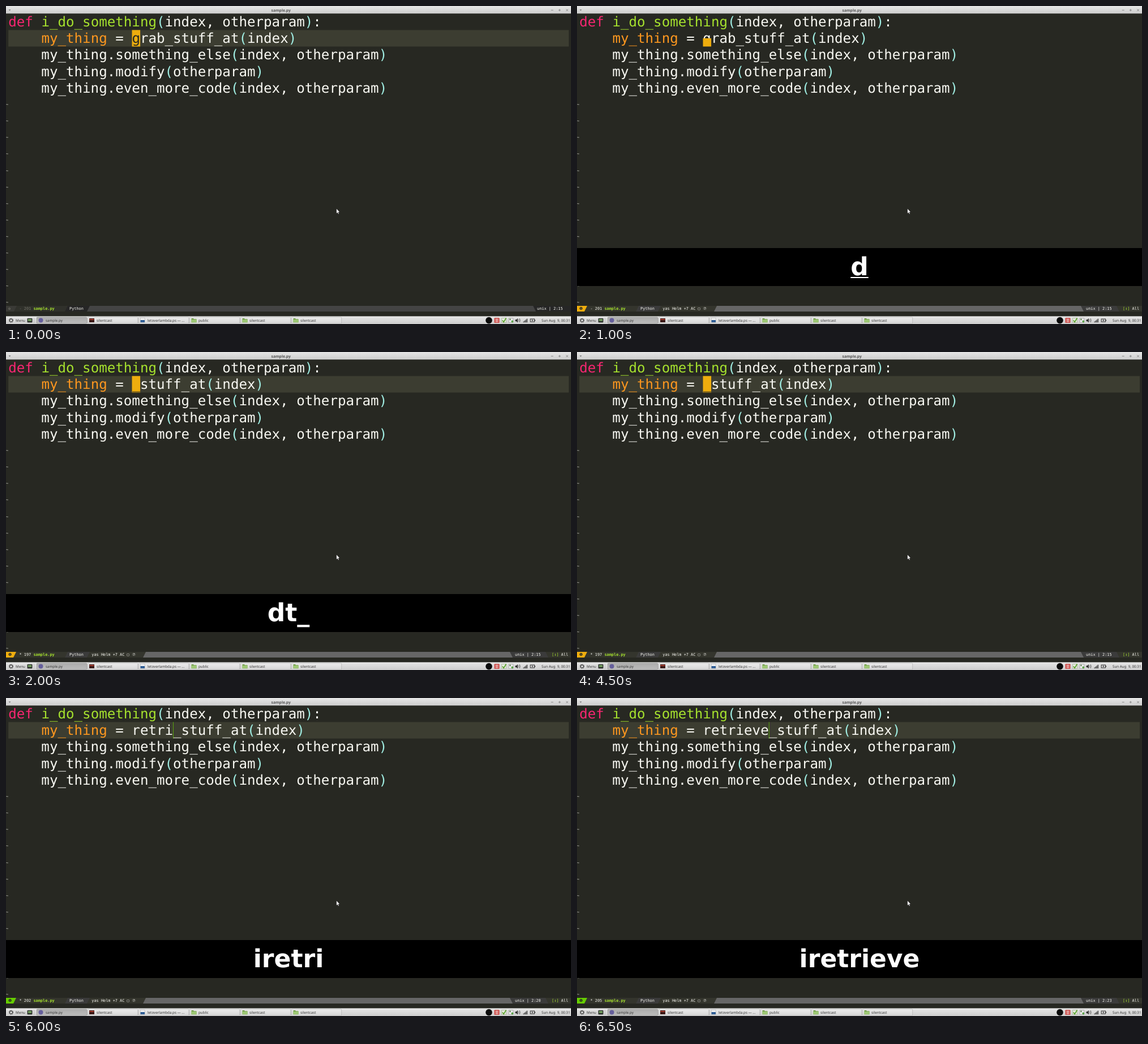
Write an HTML page that moves like this. It is 998x561 px and loops after 8000 ms.

```html
<!DOCTYPE html>
<html lang="en">
<head>
<meta charset="utf-8">
<title>sample.py</title>
<style>
  html, body { margin: 0; width: 100%; height: 100%; overflow: hidden; background: #272822; }
  #stage { position: relative; width: 998px; height: 561px; overflow: hidden; }
  svg { position: absolute; left: 0; top: 0; }
  text { white-space: pre; text-rendering: geometricPrecision; }
  .code { font: 24.177px "DejaVu Sans Mono", monospace; fill: #f8f8f2; }
  .mode { font: 6.907px "DejaVu Sans Mono", monospace; fill: #f8f8f2; }
  .ui { font: 6.24px "Noto Sans", "Open Sans", sans-serif; fill: #333; }
  .title { font: bold 6.76px "Noto Sans", "Open Sans", sans-serif; fill: #555; text-anchor: middle; }
  .kw { fill: #f92672; }
  .fn { fill: #a6e22e; }
  .var { fill: #fd971f; }
  .par { fill: #a1efe4; }
  .file { fill: #a6e22e; font-weight: bold; }
  .dim { fill: #75756c; }
  .ink { fill: #272822; }
  #keys {
    position: absolute; left: 0; top: 427px; width: 998px; height: 67px;
    background: #000; color: #fff; text-align: center; white-space: pre;
    font: bold 44px/67px "DejaVu Sans", sans-serif; text-rendering: geometricPrecision;
  }
  #keys u { text-decoration-thickness: 2px; text-underline-offset: 3px; text-decoration-skip-ink: none; }
</style>
</head>
<body>
<div id="stage">
  <svg width="998" height="561" viewBox="0 0 998 561">
    <defs>
      <linearGradient id="panel" x2="0" y2="1">
        <stop stop-color="#e6e6e6"/><stop offset="1" stop-color="#cdcdcd"/>
      </linearGradient>
      <linearGradient id="button" x2="0" y2="1">
        <stop stop-color="#ececec"/><stop offset="1" stop-color="#d6d6d6"/>
      </linearGradient>
      <linearGradient id="pressed" x2="0" y2="1">
        <stop stop-color="#acacac"/><stop offset="1" stop-color="#bcbcbc"/>
      </linearGradient>
    </defs>
    <rect width="998" height="561" fill="#272822"/>
    <rect id="line" x="4.2" y="42.4" width="989.8" height="29.1" fill="#3c3d31"/>
    <g id="editor"></g>
    <rect id="block" fill="#eead0e"/>
    <text id="under" class="code ink"></text>
    <rect id="bar" y="42.4" width=".9" height="29.1" fill="#66cd00" opacity=".8"/>
    <g id="idle"></g>
    <g id="active"></g>
    <text id="echo" class="mode" x="4.2" y="545.6"></text>
    <g id="chrome"></g>
    <path d="M583.6 357.2v9l2-1.8 1.3 2.9 1.5-.7-1.3-2.8h2.7z" fill="#fff" stroke="#111" stroke-width=".6"/>
  </svg>
  <div id="keys"></div>
</div>
<script>
const $ = id => document.getElementById(id);
const LEFT = 4.2, TOP = 13.3, CW = 14.555, LH = 29.1, COL = 15;
const colX = c => LEFT + c * CW;
const baseline = row => TOP + row * LH + 22.9;
const span = (cls, s) => `<tspan class="${cls}">${s}</tspan>`;
const tint = s => s.replace(/[()]/g, p => span('par', p));
const text = (cls, x, y, s, id = '') => `<text class="${cls}" x="${x}" y="${y}" id="${id}">${s}</text>`;
const rect = (x, y, w, h, fill, more = '') =>
  `<rect x="${x}" y="${y}" width="${w}" height="${h}" fill="${fill}" ${more}/>`;
const path = (d, fill, more = '') => `<path d="${d}" fill="${fill}" ${more}/>`;
const circle = (x, y, r, fill) => `<circle cx="${x}" cy="${y}" r="${r}" fill="${fill}"/>`;

function drawEditor() {
  const lines = [
    span('kw', 'def') + ' ' + span('fn', 'i_do_something') + tint('(index, otherparam):'),
    '',
    tint('    my_thing.something_else(index, otherparam)'),
    tint('    my_thing.modify(otherparam)'),
    tint('    my_thing.even_more_code(index, otherparam)')
  ];
  let out = lines.map((s, i) => text('code', LEFT, baseline(i), s, 'row' + i)).join('');
  for (let row = 5; row < 18; row++) out += text('mode', 0, TOP + row * LH + 17.3, '~');
  $('editor').innerHTML = out;
}

// Slanted segments: the left ones lean one way, the right ones mirror them.
const leftSeg = (x, fill) => path(`M0 529H${x + 5}L${x} 539H0z`, fill);
const rightSeg = (x, fill) => path(`M${x} 529H998V539H${x + 5}z`, fill);

function drawModelines() {
  const y = 536.1;
  $('idle').innerHTML =
    rect(0, 529, 998, 10, '#444') +
    leftSeg(143, '#262626') + leftSeg(104, '#30312b') + leftSeg(14, '#3a3a36') +
    rightSeg(931, '#262626') +
    text('mode dim', 4, y, '❂') +
    text('mode', 23.5, y, span('dim', '- 201 ') + span('file', 'sample.py')) +
    text('mode', 112, y, 'Python') + text('mode', 938, y, 'unix | 2:15');
  $('active').innerHTML =
    rect(0, 529, 998, 10, '#666') +
    leftSeg(242, '#34352d') + leftSeg(143, '#3b3b3b') + leftSeg(104, '#34352d') +
    `<g id="state">${leftSeg(13, 'inherit')}</g>` +
    rightSeg(890, '#3b3b3b') + rightSeg(953, '#34352d') +
    text('mode ink', 4, y, '❶') +
    text('mode', 23.5, y, '', 'size') + text('mode file', 48.4, y, 'sample.py') +
    text('mode', 112, y, 'Python') + text('mode', 151.3, y, 'yas Helm +7 AC') +
    text('mode', 213.6, y, '▢') + text('mode', 222.8, y, '⑦') +
    text('mode', 899, y, '', 'pos') +
    text('mode', 964, y, span('fn', '[↕]') + ' All');
}

function drawChrome() {
  const thin = 'stroke="#777" stroke-width=".8"';
  const folder = x => path(`M${x} 551h3.5l1 1.2h4.5v6h-9z`, '#6f9a48') + rect(x, 553, 9, 5.2, '#9cc773');
  const icons = [
    x => circle(x + 4, 554.5, 4, '#655f9c'),
    x => rect(x - .5, 551, 9, 7, '#3a1917') + rect(x, 552, 8, 2, '#a33c30'),
    x => rect(x, 550.5, 7.5, 8, '#f4f4f4', 'stroke="#999" stroke-width=".4"') + rect(x, 554, 7.5, 4, '#315f96'),
    folder, folder, folder
  ];
  const names = ['sample.py', 'silentcast', 'letoverlambda.ps — ...', 'public', 'silentcast', 'silentcast'];
  const tasks = names.map((name, i) => {
    const x = 54 + i * 90;
    return rect(x + .3, 548.9, 88.4, 11.4, `url(#${i ? 'button' : 'pressed'})`,
        `rx="1.2" stroke="${i ? '#aaa' : '#888'}" stroke-width=".6"`) +
      icons[i](x + 3.5) + text('ui', x + 16, 556.7, name);
  }).join('');

  const tray =
    circle(853, 554.6, 5.8, '#0a0a0a') +
    rect(862.5, 550.2, 9, 8.8, '#c94440', 'rx="1"') +
    path('M864 552.5h6M864 554.7h6M864 557h6M867 551.5v6.5', 'none', 'stroke="#f5dddd" stroke-width=".8"') +
    path('M875.5 550.5h8v8h-8z', '#e3ead9', 'stroke="#8b9b7b" stroke-width=".5"') +
    path('M876.8 554.5l2.3 3 4.4-7', 'none', 'stroke="#58a22b" stroke-width="1.6"') +
    path('M888 550.7h7.8v7.5H888z', '#eee', 'stroke="#888" stroke-width=".6"') +
    circle(890.5, 553, 1.4, '#6d8a62') + circle(894.3, 556.5, 1.9, '#59a348') +
    path('M899.5 553.2h2l2.4-2.2v7.4l-2.4-2.2h-2z', '#333') +
    path('M905.3 552.5q1.5 2.1 0 4.2M907 551.2q2.5 3.4 0 6.8', 'none', 'stroke="#444" stroke-width=".8"') +
    [0, 1, 2, 3].map(i => rect(913.6 + i * 2, 556.5 - i * 1.6, 1.5, 1.7 + i * 1.6, '#444')).join('') +
    rect(926.2, 552.1, 7.2, 5, 'none', 'stroke="#333"') + rect(933.8, 553.5, 1.2, 2.2, '#333') +
    path('M930.5 551.9l-2.2 3h1.5l-.8 2.4 2.5-3.2h-1.6z', '#333');

  $('chrome').innerHTML =
    rect(0, 0, 998, 13.3, 'url(#panel)') +
    path('M4.5 6.2h4l-2 2.2z', '#777') +
    text('title', 485.7, 9.5, 'sample.py') +
    path('M962.7 7.3h4M975.8 7.3h4M977.8 5.3v4M989.3 5.5l3.6 3.6M992.9 5.5l-3.6 3.6', 'none', thin) +
    rect(0, 547.6, 998, 13.4, 'url(#panel)') + rect(0, 547.6, 998, .6, '#f2f2f2') +
    `<circle cx="9" cy="554.6" r="2.5" fill="none" stroke="#444" stroke-width="1.1"/>` +
    `<circle cx="9" cy="554.6" r="3.6" fill="none" stroke="#444" stroke-width="1.1" stroke-dasharray="1.4"/>` +
    text('ui', 17, 556.8, 'Menu') +
    rect(37.7, 551, 8.6, 7.2, '#2d352d', 'rx=".8" stroke="#555" stroke-width=".5"') +
    rect(39, 552.4, 6, 3.2, '#78a662') +
    rect(49.5, 550, .5, 9, '#aaa') + tasks + tray +
    text('ui', 946, 556.8, 'Sun Aug  9, 00:31');
}

const steps = [
  { at: 0, word: 'grab', idle: true, cursor: 'block' },
  { at: 1000, word: 'grab', size: '- 201', cursor: 'half', keys: '<u>d</u>' },
  { at: 1500, word: 'grab', size: '- 201', cursor: 'half', keys: 'dt', echo: 'dt-' },
  { at: 2000, word: '', size: '* 197', cursor: 'block', keys: 'dt_' },
  { at: 4500, word: '', size: '* 197', cursor: 'block' },
  { at: 5000, word: 'r', size: '* 198', cursor: 'bar', keys: 'i<u>r</u>' },
  { at: 5500, word: 're', size: '* 199', cursor: 'bar', keys: 'ire' },
  { at: 6000, word: 'retri', size: '* 202', cursor: 'bar', keys: 'iretri' },
  { at: 6500, word: 'retrieve', size: '* 205', cursor: 'bar', keys: 'iretrieve' }
];

const show = (id, on) => { $(id).style.display = on ? '' : 'none'; };

function apply({ word, size = '', cursor, keys = '', echo = '', idle = false }) {
  const half = cursor === 'half', insert = cursor === 'bar';
  const col = COL + (insert ? word.length : 0);
  $('row1').innerHTML = '    ' + span('var', 'my_thing') + ' = ' + word + tint('_stuff_at(index)');
  show('line', !half);
  show('idle', idle);
  show('active', !idle);
  show('bar', insert);
  show('block', !insert);
  show('under', cursor === 'block');
  show('keys', keys);

  const height = half ? LH / 2 : LH;
  const box = { x: colX(COL), y: TOP + 2 * LH - height, width: CW, height };
  for (const k in box) $('block').setAttribute(k, box[k]);
  $('under').setAttribute('x', colX(COL));
  $('under').setAttribute('y', baseline(1));
  $('under').textContent = word[0] || '_';
  $('bar').setAttribute('x', colX(col) - .2);

  $('state').setAttribute('fill', insert ? '#66cd00' : '#eead0e');
  $('size').textContent = size;
  $('pos').textContent = 'unix | 2:' + col;
  $('echo').textContent = echo;
  $('keys').innerHTML = keys;
}

drawEditor();
drawModelines();
drawChrome();

let current;
function tick() {
  const t = performance.now() % 8000;
  const step = steps.findLast(s => s.at <= t);
  if (step !== current) apply(current = step);
  requestAnimationFrame(tick);
}
tick();
</script>
</body>
</html>
```
